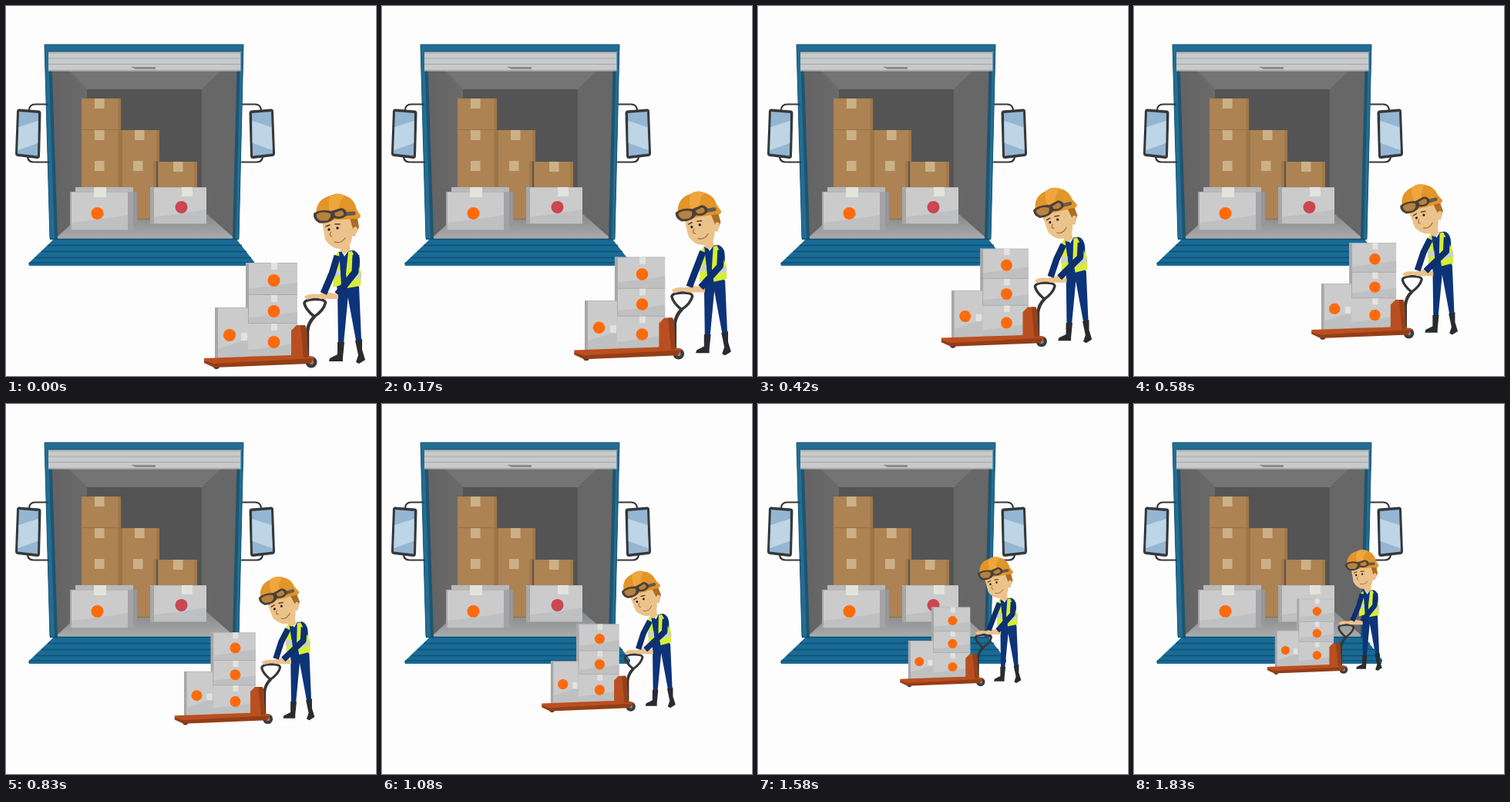
An HTML page that plays this animation: 480 by 480 pixels, repeating every 1910 ms.

```html
<!DOCTYPE html>
<html lang="en">
<head>
<meta charset="utf-8">
<title>Loading the truck</title>
<style>
  html, body { margin: 0; width: 100%; height: 100%; overflow: hidden; background: #fdfdfd; }
  svg { display: block; width: 100%; height: 100%; }
  .sleeve { fill: none; stroke: #0d2f70; stroke-width: 9; stroke-linejoin: round; }
  .skin { fill: #ecc28b; }
  .navy { fill: #0d3479; }
  .vest { fill: #d6ee35; }
  .band { fill: #c9d0cc; }
  .boot { fill: #292b2e; }
  .mark { fill: #ff6a0b; }
  .line { fill: none; stroke: #393638; stroke-linecap: round; stroke-linejoin: round; }
  .brow { stroke: #66401d; }
  .crease { stroke: #a06a3b; }
  .strap { stroke: #625b53; }
</style>
</head>
<body>
<svg viewBox="0 0 480 480">
  <defs>
    <linearGradient id="wall"><stop stop-color="#626262"/><stop offset="1" stop-color="#6b6b6b"/></linearGradient>
    <linearGradient id="floor" x2="0" y2="1"><stop stop-color="#7f8081"/><stop offset="1" stop-color="#aaabac"/></linearGradient>
    <g id="mirror">
      <path class="line" stroke-width="2.2" d="M54 127.5H38Q30 127.5 30 136M55 202.5H36Q29 202.5 28 196"/>
      <path d="M17 133.5L43 135.5Q45.500 136 45.500 139L44 195Q43.500 198.500 40 198L15 195Q12 194.500 12 191L14 137Q14 133.500 17 133.5Z" fill="#35383b"/>
      <path d="M17 137L42 139L41 194.500L15 191.500Z" fill="#94b6d2"/>
      <path d="M16.500 157L41.700 149L41.300 178L15.400 187Z" fill="#bdd5e5"/>
    </g>
  </defs>

  <g id="truck">
    <path d="M57 84H304L297 302H64Z" fill="#666"/>
    <path d="M57 84H82L105 108V264L65 300Z" fill="url(#wall)"/>
    <path d="M304 84H279L254 108V264L297 300Z" fill="#676767"/>
    <path d="M82 84H279L254 108H105Z" fill="#747474"/>
    <path d="M105 108H254V264H105Z" fill="#545454"/>
    <path d="M105 264H254L297 302H64Z" fill="url(#floor)"/>
    <path d="M50 50H308L302 302H294L300 59H59L67 302H57Z" fill="#1e5470"/>
    <path d="M50 50H308L302 302H298L304 59H55L63 302H57Z" fill="#236d92"/>
    <path d="M55 59H304.500V84.500H55Z" fill="#c8c9ca"/>
    <path d="M55 61H304M55 68H304M55 75.500H304M55 83.500H304" stroke="#a6a8aa"/>
    <path d="M162 79H194V82H168Z" fill="#8a8c8e"/>
    <path d="M50 50H308L302 302M50 50L57 302" fill="none" stroke="#1a587a"/>
    <path d="M55 59H304" stroke="#174b68"/>
    <path d="M62 302.500H299L322 332L321 337H30L29 334Z" fill="#186b97"/>
    <path d="M57 302.500H302M54 310.500H306M46 318.500H312M38 326.500H318M30 333H322" stroke="#10506f" stroke-width="1.500"/>
    <use href="#mirror"/>
    <use href="#mirror" transform="matrix(-1 0 0 1 361 0)"/>
    <g id="cargo"></g>
  </g>

  <g id="mover">
    <g id="load"></g>
    <g id="jack">
      <path class="line" stroke-width="4.500" d="M391 455L391 422Q392 411 400 403"/>
      <path class="line" stroke-width="3.600" d="M400 403Q389 394 387 386Q387 381 400 380.500Q414 380 414.500 385Q412 395 400 403Z"/>
      <circle cx="396" cy="462" r="7.500" fill="#3a3b3d"/><circle cx="396" cy="462" r="3" fill="#8c8c8c"/>
      <circle cx="273" cy="467" r="4" fill="#3a3b3d"/>
      <path d="M257 457L313 455L370 453H391L400 456L396 463L270 468L257 462Z" fill="#bb4f1f"/>
      <path d="M257 460L270 464L398 457L395 464L270 469L257 463Z" fill="#933e18"/>
      <path d="M370 421L377 414H388L390 420L392 456H370Z" fill="#b94f20"/>
      <path d="M382 414H388L390 420L392 456H386Z" fill="#964018"/>
    </g>
    <g id="worker">
      <path class="navy" d="M430 364H445L438 438H431ZM441 364H458L461 434H454Z"/>
      <path class="boot" d="M430 436H439L437 456V461H419L420 457L430 452ZM453 434L462 432V446L466 459L458 464L454 462L457 453Z"/>
      <g id="torso">
        <path class="navy" d="M431 319L451 317Q459 320 459 332L457 369H430L426 345Z"/>
        <path class="vest" d="M427 323L432 319L435 362L424 365ZM444 319L449 318L461 346L460 363L443 366L441 347Z"/>
        <path class="band" d="M425 344L434 343V350L424 352ZM443 350L461 347V353L443 357Z"/>
        <path d="M435 318H444L439 325Z" fill="#e9edf0"/>
        <g id="head">
          <path class="skin" d="M434 305H446V318L439 321L434 318Z"/>
          <path d="M444 272L456 275L458 287L452 299L445 292Z" fill="#ac6c26"/>
          <path class="skin" d="M410 279L446 275L450 289Q453 284 456 288Q457 297 449 299Q448 313 437 315Q423 317 414 303Z"/>
          <path class="line brow" stroke-width="1.600" d="M415 286L420 284M427 283L433 283"/>
          <circle cx="419" cy="290" r="1.700" fill="#211c19"/><circle cx="430" cy="288" r="1.700" fill="#211c19"/>
          <path class="line crease" stroke-width="1.200" d="M422 293Q418 298 423 299M426 306Q434 309 440 301"/>
          <path d="M402 269Q403 250 421 246Q430 241 440 246Q452 250 455 264L460 272Q460 277 452 276L404 279Z" fill="#e29528"/>
          <path d="M421 246Q430 241 440 246Q432 251 431 267L420 268Q417 253 421 246Z" fill="#efa63c"/>
          <path class="line strap" stroke-width="5" d="M438 270L451 269"/>
          <path d="M399 269Q408 263 422 266L435 262Q443 264 442 271Q437 278 426 275Q420 283 406 281.500Q398 277 399 269Z" fill="#4a4038"/>
          <path d="M403 270Q412 265.500 421 269.500Q422 276 416 278.500H408Q402 276 403 270ZM426 268.500L435 265Q439 267 438 271Q433 275 427 272Z" fill="#b5823f"/>
        </g>
      </g>
      <path class="skin" d="M387 377Q393 372 405 374L416 371L431 374V380L408 380L402 378L390 381Z"/>
      <path class="sleeve" id="farArm"/>
      <path class="sleeve" id="nearArm"/>
    </g>
  </g>
</svg>
<script>
const byId = id => document.getElementById(id);
const rect = (x, y, w, h, fill) => `<rect x="${x}" y="${y}" width="${w}" height="${h}" fill="${fill}"/>`;
const dot = (x, y, r = 8) => `<circle class="mark" cx="${x}" cy="${y}" r="${r}"/>`;

const brownBox = (x, y, w, h, tape) =>
  rect(x, y, w, h, '#ad8353') + rect(x + w - 4, y, 4, h, '#a0784b') +
  rect(x, y + h - 1, w, 1, '#967046') + rect(tape, y, 12.5, 13, '#cbb188');

// Pale carton with a darker left side and a slanted shadow across the bottom.
const paleBox = (x, y, w, h, side = 4) =>
  rect(x, y, w, h, '#cbcbcc') + rect(x, y, side, h, '#a7a7aa') +
  `<path d="M${x + side} ${y + h * .8}Q${x + w * .55} ${y + h * .72} ${x + w} ${y + h * .6}V${y + h}H${x + side}Z" fill="#bfc0c1"/>` +
  rect(x, y, w, .8, '#b2b2b4') + rect(x, y + h - .8, w, .8, '#a5a5a8');

byId('cargo').innerHTML =
  [120, 161, 201].map(y => brownBox(98, y, 51, y > 200 ? 36 : 41, 115)).join('') +
  brownBox(147, 161, 52, 41, 167) + brownBox(147, 201, 48, 76, 165) +
  rect(147, 161, 4, 116, '#9b7448') + brownBox(197, 202, 51, 35, 217) +
  rect(165, 241, 5, 44, '#979799') + rect(90, 235, 75, 54, '#b9b9bb') + rect(158, 241, 7, 49, '#a3a3a5') +
  paleBox(83, 241, 75, 50, 2) + rect(114, 235, 16, 13, '#e3e2dc') + dot(118.5, 269) +
  paleBox(187, 235, 73, 48, 5) + rect(228, 235, 14, 12, '#e3e2dc') +
  '<circle cx="227.5" cy="261" r="8" fill="#ca4651"/>';

byId('load').innerHTML =
  paleBox(310, 411, 68, 44) + paleBox(311, 374, 67, 38) + paleBox(311, 333, 67, 42) +
  [333, 375, 412].map(y => rect(344, y, 8, 9, '#e3e2dd')).join('') +
  [356, 396, 436].map(y => dot(347.5, y)).join('') +
  paleBox(271, 391, 43, 67) + rect(305, 424, 8, 10, '#e3e2dd') + dot(290, 427);

const LOOP = 1910, FPS = 12;
const LEAN = [[0, 0], [4, .8], [7, .9], [10, .97], [13, 1], [16, .87], [19, .45], [22, 0]];
const mix = (a, b, k) => a + (b - a) * k;

function leanAt(step) {
  const n = Math.max(1, LEAN.findIndex(([at]) => at >= step));
  const [[a, from], [b, to]] = [LEAN[n - 1], LEAN[n]];
  return mix(from, to, (step - a) / (b - a));
}

// Each joint goes from its upright place to its leaning place.
const FAR_ARM = [[430, 324, 426, 328], [423, 347, 416, 347], [412, 373, 408, 372]];
const NEAR_ARM = [[454, 323, 450, 325], [453, 345, 449, 345], [430, 374, 419, 373]];
const armPath = (joints, k) =>
  'M' + joints.map(([x, y, u, v]) => `${mix(x, u, k)} ${mix(y, v, k)}`).join('L');
const place = (id, value) => byId(id).setAttribute('transform', value);

let shown = -1;
function draw() {
  const time = performance.now() % LOOP;
  const step = Math.min(22, Math.floor(time * FPS / 1000 + .041));
  if (step !== shown) {
    shown = step;
    const lean = leanAt(step);
    place('mover', `translate(${347 - 5 * step} ${436 - 5 * step}) scale(${1 - .0131 * step}) translate(-347 -436)`);
    place('torso', `rotate(${-5 * lean} 444 368)`);
    place('head', `translate(${-4 * lean} ${2 * lean}) rotate(${-7 * lean} 442 316)`);
    byId('farArm').setAttribute('d', armPath(FAR_ARM, lean));
    byId('nearArm').setAttribute('d', armPath(NEAR_ARM, lean));
  }
  requestAnimationFrame(draw);
}
draw();
</script>
</body>
</html>
```
